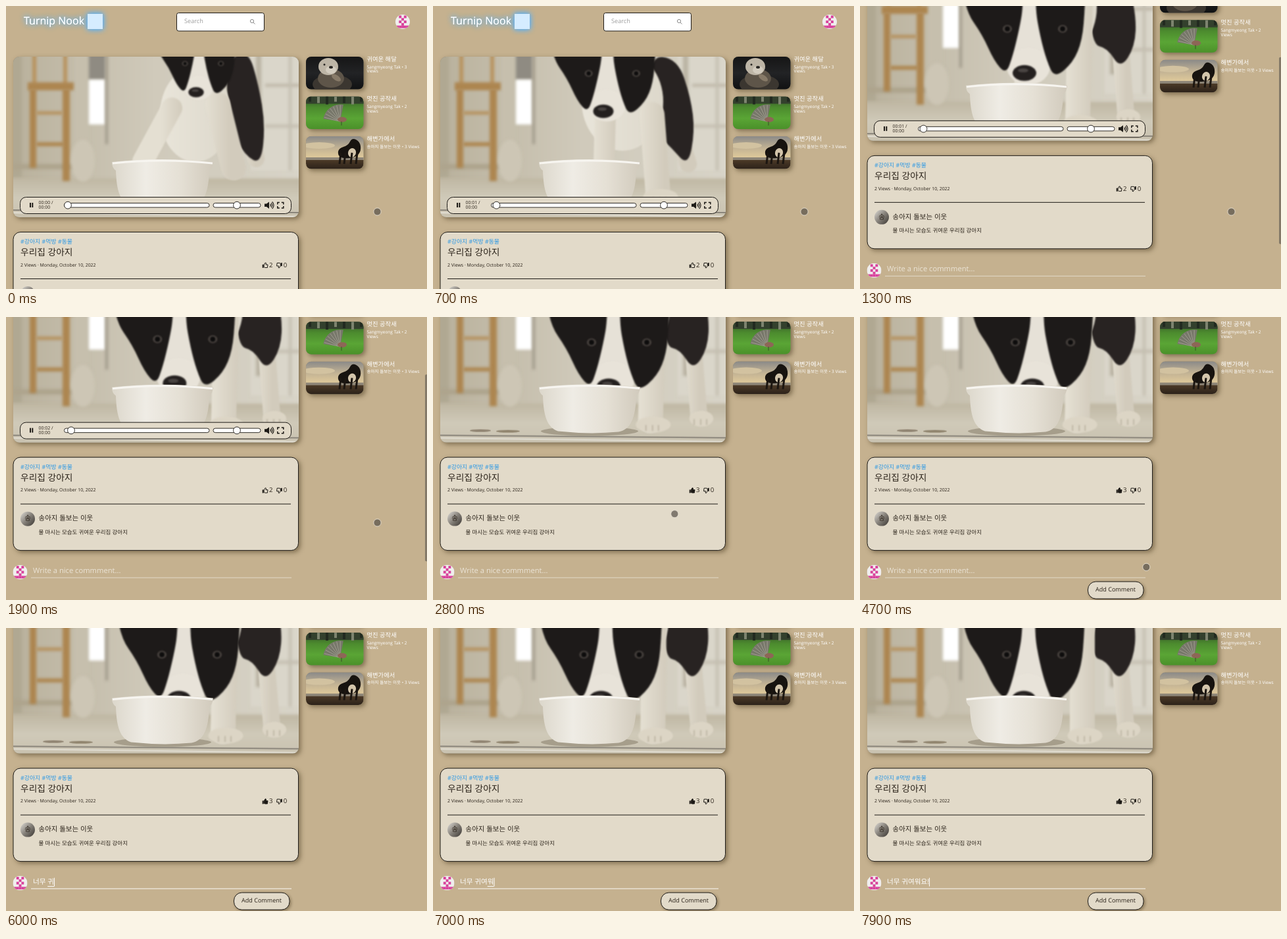
These frames come from a looping animation (640x430 px, 8000 ms). An HTML page with a canvas:

```html
<!DOCTYPE html>
<html lang="ko">
<head>
<meta charset="utf-8">
<title>우리집 강아지</title>
<style>
html, body { margin: 0; width: 100%; height: 100%; overflow: hidden; background: #c5b18f; }
canvas { display: block; width: 640px; height: 430px; }
</style>
</head>
<body>
<canvas id="stage"></canvas>
<script>
const W = 640, H = 430, LOOP = 8000, STEP = 100;
const BG = '#c5b18f', CARD = '#e2dac9', INK = '#2a2219', LINE = '#1d1a16';
const FONT = '"Open Sans", "Noto Sans CJK KR", "Noto Sans CJK", sans-serif';
const USER = 'Sangmyeong Tak', OWNER = '송아지 돌보는 이웃';

const canvas = document.getElementById('stage');
const dpr = window.devicePixelRatio || 1;
canvas.width = W * dpr;
canvas.height = H * dpr;
let c = canvas.getContext('2d');

// ---------- helpers ----------
const clamp = v => Math.max(0, Math.min(1, v));
const smooth = u => u * u * (3 - 2 * u);

// keys: [time, ...values], eased between neighbours
function track(keys, t) {
  let i = 0;
  while (i < keys.length - 2 && t > keys[i + 1][0]) i++;
  const a = keys[i], b = keys[i + 1];
  const u = smooth(clamp((t - a[0]) / (b[0] - a[0])));
  return a.slice(1).map((v, k) => v + (b[k + 1] - v) * u);
}

function text(s, x, y, size, color, weight = 400, align = 'left') {
  c.font = `${weight} ${size}px ${FONT}`;
  c.textAlign = align;
  c.textBaseline = 'middle';
  c.fillStyle = color;
  c.fillText(s, x, y);
}

function rect(x, y, w, h, color) {
  c.fillStyle = color;
  c.fillRect(x, y, w, h);
}

function round(x, y, w, h, r, fill, stroke, width = 1) {
  c.beginPath();
  c.roundRect(x, y, w, h, r);
  if (fill) { c.fillStyle = fill; c.fill(); }
  if (stroke) { c.strokeStyle = stroke; c.lineWidth = width; c.stroke(); }
}

function oval(x, y, rx, ry, fill, turn = 0) {
  c.beginPath();
  c.ellipse(x, y, rx, ry, turn, 0, 7);
  c.fillStyle = fill;
  c.fill();
}

function line(x1, y1, x2, y2, color, width = 1) {
  c.beginPath();
  c.moveTo(x1, y1);
  c.lineTo(x2, y2);
  c.strokeStyle = color;
  c.lineWidth = width;
  c.stroke();
}

// closed soft shape through the midpoints of the given points
function blob(p, fill) {
  const n = p.length / 2;
  const at = i => [p[(i % n) * 2], p[(i % n) * 2 + 1]];
  const mid = i => { const a = at(i), b = at(i + 1); return [(a[0] + b[0]) / 2, (a[1] + b[1]) / 2]; };
  c.beginPath();
  c.moveTo(...mid(0));
  for (let i = 1; i <= n; i++) c.quadraticCurveTo(...at(i), ...mid(i));
  c.fillStyle = fill;
  c.fill();
}

function ramp(x1, y1, x2, y2, ...colors) {
  const g = c.createLinearGradient(x1, y1, x2, y2);
  colors.forEach((col, i) => g.addColorStop(i / (colors.length - 1), col));
  return g;
}

function shadowed(draw, blur = 7, shift = 3) {
  c.save();
  c.shadowColor = 'rgba(60,45,20,.5)';
  c.shadowBlur = blur * dpr;
  c.shadowOffsetX = c.shadowOffsetY = shift * dpr;
  draw();
  c.restore();
}

function clipped(x, y, w, h, r, draw) {
  shadowed(() => round(x, y, w, h, r, '#8d8674'));
  c.save();
  c.beginPath();
  c.roundRect(x, y, w, h, r);
  c.clip();
  draw();
  c.restore();
}

// ---------- video ----------
function paintRoom() {
  c.filter = 'blur(2px)';
  rect(0, 60, 460, 270, ramp(11, 0, 445, 0, '#b9b19c', '#c5beac', '#d0cabb', '#d3cec0', '#d8d4c8'));
  rect(0, 60, 24, 200, '#b0a892');
  rect(104, 60, 22, 195, '#c6bfad');
  rect(0, 262, 460, 70, ramp(0, 262, 0, 321, '#bfb7a3', '#d0cab9', '#c9c2b0'));
  rect(11, 240, 95, 8, '#aea48d');
  const wood = '#ad8650';
  rect(40, 70, 6, 50, '#b8935f');
  rect(87, 70, 6, 50, '#b8935f');
  rect(33, 116, 70, 12, wood);
  rect(36, 126, 10, 120, wood);
  rect(86, 126, 11, 140, wood);
  rect(46, 160, 40, 5, '#b5925f');
  rect(46, 207, 42, 6, wood);
  oval(117, 235, 18, 32, '#cdc6b5');
  rect(126, 60, 25, 52, '#8f8b82');
  rect(126, 112, 25, 68, '#ffffff');
  rect(151, 70, 4, 140, '#a29b8c');
  rect(372, 60, 80, 190, '#dad6ca');
  rect(380, 60, 8, 160, '#bab3a3');
  rect(394, 118, 60, 5, '#c1baab');
  rect(394, 180, 60, 5, '#c6c0b2');
  rect(430, 60, 4, 190, '#c4beb0');
  c.filter = 'blur(.6px)';
  line(0, 310, 460, 314, '#77726a', 1.4);
  line(0, 314, 460, 320, '#e3dfd4', 2);
  oval(72, 303, 16, 2, '#918573');
  oval(114, 304, 18, 2, '#91856f');
  c.filter = 'none';
}

const room = document.createElement('canvas');
room.width = W * dpr;
room.height = 330 * dpr;
function buildRoom() {
  const main = c;
  c = room.getContext('2d');
  c.scale(dpr, dpr);
  paintRoom();
  c = main;
}

const HEAD = [
  [0, 289, 131, .65], [700, 259, 160, .86], [1300, 250, 218, 1], [1800, 256, 231, 1],
  [2800, 267, 236, 1], [4700, 262, 236, 1], [6000, 263, 238, 1], [7900, 249, 238, 1]
];
const NEAR_LEG = [[0, 322, 150, 346, 246], [700, 333, 165, 342, 284], [1300, 335, 105, 331, 288], [6000, 334, 105, 330, 288], [7900, 338, 105, 338, 288]];
const FAR_LEG = [[0, 252, 155, 208, 236], [700, 262, 165, 260, 240], [1300, 258, 150, 250, 240], [7900, 258, 150, 250, 240]];
const HIND_LEG = [[0, 366, 170, 380, 232], [700, 366, 170, 388, 240], [1300, 392, 125, 404, 279], [7900, 390, 125, 404, 279]];
const CHEST = [[0, 288, 165, 54, 72], [700, 288, 145, 62, 75], [1300, 290, 118, 70, 80], [7900, 288, 118, 70, 80]];
const BACK = [
  [0, 333, 85, 368, 66, 384, 120, 394, 180, 388, 240, 364, 228, 340, 185],
  [700, 326, 75, 372, 80, 392, 140, 398, 190, 388, 244, 362, 215, 336, 190],
  [1300, 345, 70, 405, 70, 420, 130, 418, 178, 396, 212, 376, 180, 352, 175],
  [7900, 345, 70, 405, 70, 420, 130, 416, 178, 394, 212, 374, 180, 352, 175]
];

function leg(p, width, paw) {
  c.lineCap = 'round';
  line(p[0], p[1], p[2], p[3], ramp(p[0] - width / 2, 0, p[0] + width / 2, 0, '#e4dfd2', '#d2cbbc'), width);
  if (paw) {
    oval(p[2] + 4, p[3] + 6, width * .7, 12, '#dcd5c5');
    for (const d of [-7, 3, 12]) line(p[2] + d, p[3] + 7, p[2] + d, p[3] + 15, '#a69d8b', 1);
  }
  c.lineCap = 'butt';
}

function dog(t) {
  c.filter = 'blur(1.2px)';
  const fur = '#1d1a19';
  leg(track(HIND_LEG, t), 26, t > 1000);
  blob(track(BACK, t), '#282322');
  const [cx, cy, rx, ry] = track(CHEST, t);
  oval(cx, cy, rx, ry, ramp(cx - rx, 0, cx + rx, 0, '#e9e5da', '#ddd8cb'));
  leg(track(FAR_LEG, t), 32);
  leg(track(NEAR_LEG, t), 38, t > 600);

  const [x, y, s] = track(HEAD, t);
  c.save();
  c.translate(x, y);
  c.scale(s, s);
  oval(10, -80, 66, 68, '#e6e1d7');
  oval(6, -10, 33, 28, '#e8e3d9');
  blob([-98, -165, -2, -165, -2, -100, -8, -66, -18, -25, -28, 2, -46, -18, -64, -58, -90, -95], fur);
  blob([20, -165, 94, -165, 92, -100, 88, -50, 74, -16, 46, 8, 34, -18, 24, -55, 16, -100], fur);
  for (const ex of [-26, 58]) {
    oval(ex, -67, 7, 6, '#4a4440');
    oval(ex, -67, 4, 4, '#0d0c0c');
  }
  oval(0, 0, 18, 12, '#24201f');
  oval(-2, -4, 8, 3, '#4a4543');
  c.restore();
  c.filter = 'none';
}

function bowl() {
  c.filter = 'blur(.7px)';
  oval(238, 304, 74, 7, 'rgba(120,110,90,.45)');
  c.beginPath();
  c.moveTo(161, 237);
  c.quadraticCurveTo(237, 229, 315, 237);
  c.quadraticCurveTo(314, 247, 309, 250);
  c.bezierCurveTo(308, 285, 300, 302, 282, 305);
  c.quadraticCurveTo(238, 309, 190, 304);
  c.bezierCurveTo(173, 298, 168, 280, 167, 250);
  c.quadraticCurveTo(161, 246, 161, 237);
  c.fillStyle = ramp(161, 0, 315, 0, '#dcd7cb', '#efece5', '#e5e0d5', '#d1cabc');
  c.fill();
  c.beginPath();
  c.moveTo(162, 239);
  c.quadraticCurveTo(237, 231, 314, 239);
  c.strokeStyle = '#f7f5f0';
  c.lineWidth = 3;
  c.stroke();
  c.filter = 'none';
}

function slider(x, w, knob) {
  round(x, 299.5, w, 6.5, 3.2, '#fff', LINE, .9);
  c.beginPath();
  c.arc(knob, 302.7, 5.4, 0, 7);
  c.fillStyle = '#fff';
  c.fill();
  c.stroke();
}

function controls(t) {
  c.save();
  c.globalAlpha = 1 - clamp((t - 2000) / 300);
  const sec = Math.floor((t + 500) / 1000);
  round(21.5, 290.5, 412, 25, 9, CARD, LINE);
  rect(36, 299, 2, 7, LINE);
  rect(39.3, 299, 2, 7, LINE);
  text(`00:0${sec} /`, 49.5, 299.6, 6.9, INK);
  text('00:00', 49.5, 306.2, 6.9, INK);
  slider(88.5, 220.5, 94 + sec * 2.5);
  slider(315, 72, 351);
  c.beginPath();
  c.moveTo(393, 300.5); c.lineTo(396, 300.5); c.lineTo(400, 297.5);
  c.lineTo(400, 308); c.lineTo(396, 305); c.lineTo(393, 305);
  c.fillStyle = LINE;
  c.fill();
  c.lineWidth = 1.2;
  for (const r of [2.4, 4.7, 7]) {
    c.beginPath();
    c.arc(400, 302.7, r, -.85, .85);
    c.stroke();
  }
  c.lineWidth = 1.5;
  for (const sx of [-1, 1]) for (const sy of [-1, 1]) {
    const x = 417.3 + sx * 4.5, y = 302.7 + sy * 4.3;
    c.beginPath();
    c.moveTo(x - sx * 3, y); c.lineTo(x, y); c.lineTo(x, y - sy * 3);
    c.stroke();
  }
  c.restore();
}

function video(t) {
  clipped(11, 77, 434, 244, 9, () => {
    c.drawImage(room, 0, 0, W, 330);
    dog(t);
    bowl();
  });
  if (t < 2300) controls(t);
}

// ---------- sidebar ----------
function otter(x, y) {
  rect(x, y, 88, 50, ramp(0, y, 0, y + 50, '#161616', '#222325', '#101112'));
  oval(x + 40, y + 42, 30, 15, '#3b3630');
  oval(x + 38, y + 33, 20, 14, '#5e5549');
  oval(x + 34, y + 15, 15, 13, '#bdb5a6');
  oval(x + 38, y + 20, 8, 6, '#d3ccbf');
  oval(x + 38, y + 16, 3, 2, '#2a2724');
  oval(x + 28, y + 12, 1.5, 1.5, '#2a2724');
  oval(x + 46, y + 32, 8, 4, '#877a68', .6);
}

function peacock(x, y) {
  rect(x, y, 88, 50, ramp(0, y, 0, y + 50, '#33502a', '#4c8b2e', '#5aa535', '#4a9029'));
  rect(x, y, 88, 11, '#33402d');
  for (let i = 0; i < 7; i++) rect(x + 4 + i * 13, y, 4, 8 + i % 3 * 2, i % 2 ? '#7d846f' : '#222a20');
  c.beginPath();
  c.moveTo(x + 52, y + 38);
  c.arc(x + 52, y + 38, 26, 3.3, 4.9);
  c.fillStyle = '#77776a';
  c.fill();
  for (let a = 3.4; a < 4.9; a += .22)
    line(x + 52, y + 38, x + 52 + 25 * Math.cos(a), y + 38 + 25 * Math.sin(a), '#aaa698', .8);
  oval(x + 55, y + 35, 7, 4, '#8d6656');
  line(x + 54, y + 38, x + 54, y + 44, '#3c4a2a');
}

function beach(x, y) {
  rect(x, y, 88, 50, ramp(0, y, 0, y + 36, '#8b8a88', '#c3b394', '#e6cf9c'));
  oval(x + 20, y + 14, 24, 5, '#d2c2a0');
  rect(x, y + 32, 88, 5, '#8d8577');
  rect(x, y + 36, 88, 15, ramp(0, y + 36, 0, y + 50, '#4c3a27', '#2b2119'));
  blob([x + 50, y + 18, x + 64, y + 14, x + 70, y + 2, x + 82, y + 8, x + 84, y + 22, x + 76, y + 32, x + 56, y + 34, x + 48, y + 28], '#17130f');
  oval(x + 70, y + 25, 6, 7, '#d3c5ab', .3);
  for (const d of [53, 60, 70, 78]) line(x + d, y + 25, x + d - 2, y + 42, '#1c1611', 3);
}

function sidebar() {
  const items = [
    [77, otter, '귀여운 해달', USER + ' • 3', 'Views'],
    [137.5, peacock, '멋진 공작새', USER + ' • 2', 'Views'],
    [198, beach, '해변가에서', OWNER + ' • 3 Views', '']
  ];
  for (const [y, art, title, by, more] of items) {
    clipped(456, y, 87.5, 49.5, 8, () => art(456, y));
    text(title, 548.5, y + 4.5, 9.3, '#fff', 500);
    text(by, 548.5, y + 16, 6.55, '#fff', 500);
    text(more, 548.5, y + 22.7, 6.55, '#fff', 500);
  }
}

// ---------- page ----------
function avatar(x, y) {
  c.save();
  c.beginPath();
  c.arc(x, y, 11, 0, 7);
  c.clip();
  rect(x - 11, y - 11, 22, 22, '#f0eeee');
  ['01010', '00100', '01010', '00100', '11111'].forEach((row, j) => {
    for (let i = 0; i < 5; i++)
      if (row[i] === '1') rect(x - 9.5 + i * 3.8, y - 9.5 + j * 3.8, 3.9, 3.9, '#d8429b');
  });
  c.restore();
}

function header() {
  c.save();
  c.shadowColor = '#5bb0f5';
  c.shadowBlur = 8 * dpr;
  for (let i = 0; i < 2; i++) {
    text('Turnip Nook', 27, 24, 16, '#fff', 500);
    rect(124, 12, 23, 23, '#d5ecff');
  }
  c.restore();
  round(259.5, 10.5, 133, 27.5, 3, '#fff', LINE);
  text('Search', 271, 24, 9.2, '#9d9d9d');
  c.beginPath();
  c.arc(374, 23, 2.6, 0, 7);
  c.strokeStyle = '#8a8a8a';
  c.lineWidth = 1;
  c.stroke();
  line(376, 25, 378.5, 27.5, '#8a8a8a');
  avatar(603, 24);
}

function thumb(x, y, flip, full) {
  c.save();
  c.translate(x, y);
  c.scale(flip, flip);
  c.beginPath();
  c.moveTo(-1.8, -.8); c.lineTo(.2, -4); c.lineTo(1.5, -3.4); c.lineTo(1, -1);
  c.lineTo(4, -1); c.lineTo(3.4, 3.5); c.lineTo(-.4, 3.5); c.lineTo(-1.8, 2.8);
  c.closePath();
  c.fillStyle = c.strokeStyle = LINE;
  c.lineWidth = 1;
  c.lineJoin = 'round';
  c.stroke();
  if (full) c.fill();
  rect(-4.3, -1.2, 2, 5, LINE);
  c.restore();
}

function card(t) {
  const liked = t >= 2400;
  shadowed(() => round(11, 343.5, 433.5, 141.5, 11, CARD));
  round(11, 343.5, 433.5, 141.5, 11, null, LINE);
  text('#강아지 #먹방 #동물', 22, 359, 8.9, '#2a97e4');
  text('우리집 강아지', 22, 375.5, 13.75, INK);
  text('2 Views · Monday, October 10, 2022', 22, 394, 6.95, INK);
  thumb(394, 394, 1, liked);
  text(liked ? '3' : '2', 400, 394.3, 9.6, INK);
  thumb(415.5, 394, -1, false);
  text('0', 421.8, 394.3, 9.6, INK);
  line(22, 414.5, 433, 414.5, LINE);
  oval(33, 437, 11, 11, ramp(24, 429, 42, 445, '#cbc8c2', '#858079', '#4b4742'));
  text(OWNER[0], 33, 437, 10.5, INK, 400, 'center');
  text(OWNER, 49.5, 437, 10.5, INK);
  text('물 마시는 모습도 귀여운 우리집 강아지', 49.5, 458, 8.46, INK);
}

// keystrokes: time, text so far, last syllable still composing
const TYPING = [
  [5000, 'ㄴ', 1], [5100, '너', 1], [5300, '넘', 1], [5400, '너무', 1], [5600, '너무 ', 0],
  [5700, '너무 ㄱ', 1], [5800, '너무 구', 1], [6000, '너무 귀', 1], [6300, '너무 귕', 1],
  [6500, '너무 귀여', 1], [6700, '너무 귀영', 1], [6800, '너무 귀여우', 1], [7000, '너무 귀여워', 1],
  [7200, '너무 귀여웡', 1], [7400, '너무 귀여워요', 1], [7700, '너무 귀여워요!', 0]
];
const FOCUS = 4100;

function comment(t) {
  const key = TYPING.filter(k => k[0] <= t).pop();
  avatar(21.5, 518);
  line(38, 526.5, 434, 526.5, key ? '#fbf9f5' : '#e3d9c8');
  let end = 41;
  if (key) {
    const [, s, composing] = key;
    text(s, 41, 516.5, 10.6, '#fff');
    end += c.measureText(s).width;
    if (composing) line(end - c.measureText(s.slice(-1)).width, 523, end, 523, '#fff');
  } else {
    text('Write a nice commment...', 41, 516.5, 11.2, '#ebe4d6');
  }
  if (t < FOCUS) return;
  if (key || Math.floor((t - FOCUS) / 500) % 2 === 0) rect(end, 510, 1, 13, '#fff');
  shadowed(() => round(346.5, 532.5, 84.5, 26, 12, CARD), 5, 2);
  round(346.5, 532.5, 84.5, 26, 12, null, LINE);
  text('Add Comment', 388.5, 545, 9.05, INK, 400, 'center');
}

const POINTER = [
  [1900, 564.5, 312.5], [2300, 394, 265], [2500, 394, 265], [2800, 367.3, 299.2],
  [3500, 367.3, 299.2], [3900, 330, 386], [4200, 330, 386], [4700, 435.3, 380]
];

function pointer(t) {
  if (t >= TYPING[0][0]) return;
  const [x, y] = track(POINTER, t);
  oval(x, y, 5.6, 5.6, 'rgba(82,76,70,.68)');
  c.strokeStyle = 'rgba(238,232,220,.8)';
  c.lineWidth = 1;
  c.stroke();
}

const scrollAt = t => t < 950 ? 0 : 130.4 * (1 - Math.exp(-Math.pow((t - 950) / 190, 1.3)));

function scrollbar(t, top) {
  const a = clamp((t - 950) / 50) * (1 - clamp((t - 2100) / 300));
  if (a <= 0) return;
  c.globalAlpha = a;
  round(637, top * .67, 4, 284, 2, 'rgba(120,112,98,.85)');
  c.globalAlpha = 1;
}

function draw(t) {
  const top = scrollAt(t);
  c.setTransform(dpr, 0, 0, dpr, 0, 0);
  c.textRendering = 'geometricPrecision';
  rect(0, 0, W, H, BG);
  c.save();
  c.translate(0, -top);
  header();
  video(t);
  sidebar();
  card(t);
  comment(t);
  c.restore();
  scrollbar(t, top);
  pointer(t);
}

buildRoom();
const start = performance.now();
let shown = -1;
function tick() {
  const t = Math.floor((performance.now() - start) % LOOP / STEP) * STEP;
  if (t !== shown) draw(shown = t);
  requestAnimationFrame(tick);
}
tick();
</script>
</body>
</html>
```
